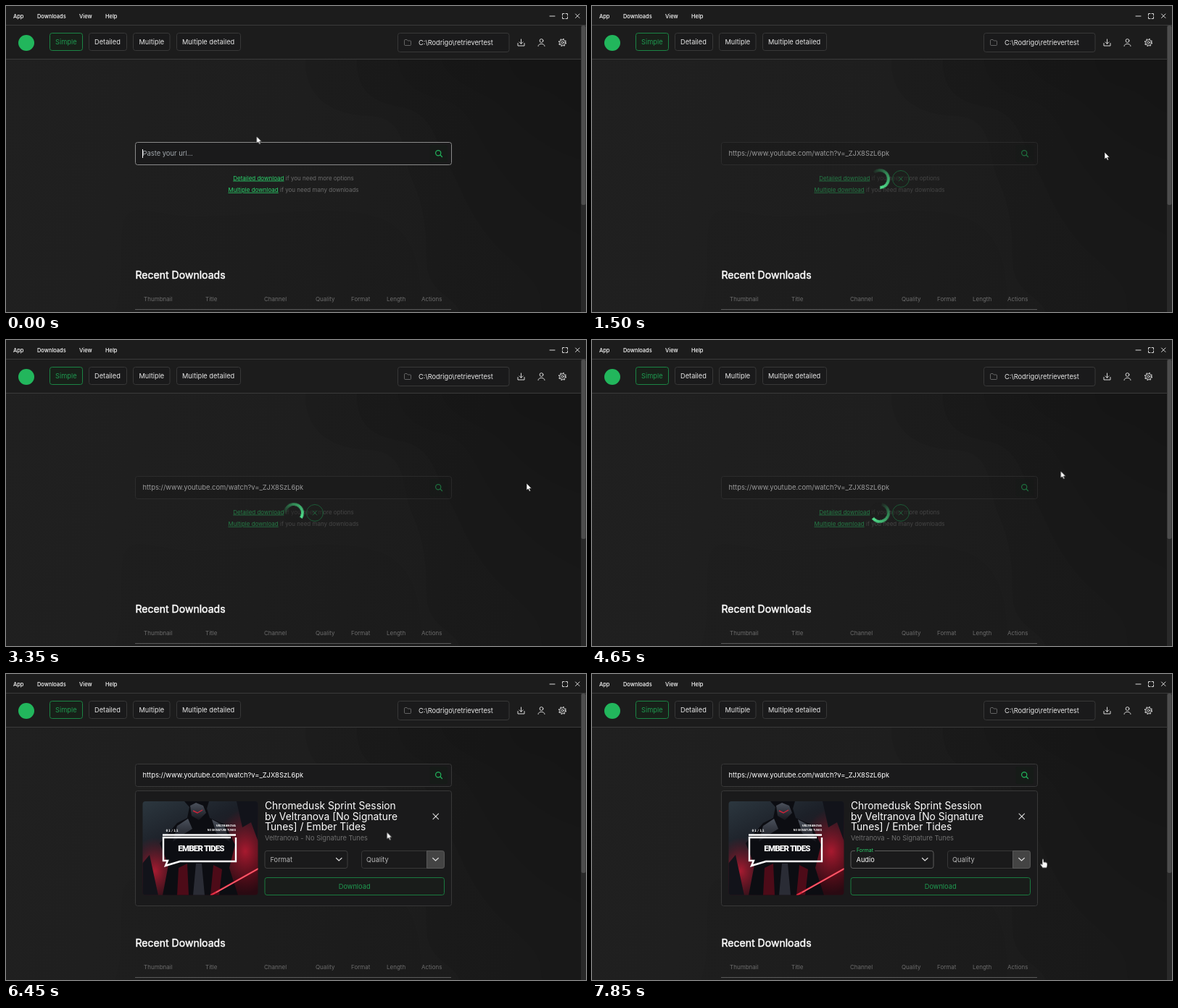
Write an HTML page that moves like this. It is 800 px wide and 423 px high and loops after 8000 ms.

```html
<!DOCTYPE html>
<html lang="en">
<head>
<meta charset="utf-8">
<title>Video downloader</title>
<style>
html, body { margin: 0; width: 100%; height: 100%; overflow: hidden; background: #1c1c1c; }
#stage { position: absolute; left: 0; top: 0; width: 800px; height: 423px; overflow: hidden; }
svg { position: absolute; left: 0; top: 0; }
text { font-family: Inter, "Liberation Sans", sans-serif; font-size: 9.25px; fill: #e8e8e8; }
.menu text { font-size: 7.45px; font-weight: 500; fill: #fff; }
.small text, text.small { font-size: 8px; fill: #6c6c6c; }
.title text { font-size: 13.8px; fill: #fff; }
#search text { font-size: 9.38px; }
.link { fill: #2bd46c; text-decoration: underline; }
.box { fill: #1a1a1b; stroke: #383838; }
.line { fill: none; stroke: #d8d8d8; stroke-linecap: round; stroke-linejoin: round; }
.green { stroke: #22b65c; }

.step, .move { animation: 8s infinite; }
.step { animation-timing-function: step-end; }
.move { animation-timing-function: linear; }

#search { animation-name: search; }
@keyframes search {
  0% { opacity: 1; transform: none; }
  9.375% { opacity: .55; transform: none; }
  75%, 100% { opacity: 1; transform: translateY(-64px); }
}
#field { animation-name: field; }
@keyframes field { 0% { stroke: #8a8a8a; } 9.375%, 100% { stroke: #383838; } }
#caret { animation-name: caret; }
@keyframes caret { 0% { opacity: 1; } 6.875%, 100% { opacity: 0; } }
#hint { animation-name: hint; }
@keyframes hint { 0% { opacity: 1; } 9.375%, 100% { opacity: 0; } }
#url { animation-name: url; }
@keyframes url { 0% { opacity: 0; } 9.375%, 100% { opacity: 1; } }
#links { animation-name: links; }
@keyframes links { 0% { opacity: 1; } 9.375% { opacity: .5; } 75%, 100% { opacity: 0; } }
.busy { animation-name: busy; }
@keyframes busy { 0% { opacity: 0; } 9.375% { opacity: 1; } 75%, 100% { opacity: 0; } }
#card { animation-name: card; }
@keyframes card { 0% { opacity: 0; } 75%, 100% { opacity: 1; } }

#gap { animation-name: gap; }
@keyframes gap { 0% { opacity: 0; } 89%, 100% { opacity: 1; } }
#label { animation-name: label; }
@keyframes label {
  0%, 88.1% { transform: translate(364.5px, 259.5px); fill: #b8b8b8; }
  90%, 100% { transform: translate(365px, 246.2px) scale(.75); fill: #2bd46c; }
}
#select { animation-name: select; }
@keyframes select { 0% { stroke: #3e3e3e; } 88.1%, 100% { stroke: #5c5c5c; } }
#list { animation-name: list; }
@keyframes list { 0% { opacity: 0; } 88.1% { opacity: 1; } 93.75%, 100% { opacity: 0; } }
#hover { animation-name: hover; }
@keyframes hover {
  0% { opacity: 0; transform: translateY(-24.5px); }
  89.4% { opacity: 1; transform: translateY(-24.5px); }
  90.3% { opacity: 1; transform: none; }
  92.5%, 100% { opacity: 1; transform: translateY(-24.5px); }
}
#value { animation-name: value; }
@keyframes value { 0% { opacity: 0; } 93.75%, 100% { opacity: 1; } }

#pointer { animation-name: pointer; }
@keyframes pointer {
  0% { transform: translate(345.5px, 180px); }
  3.125%, 10% { transform: translate(349px, 183px); animation-timing-function: ease-in-out; }
  17.5%, 20% { transform: translate(707px, 202px); }
  30%, 48% { transform: translate(718px, 198px); animation-timing-function: ease-in-out; }
  58.125% { transform: translate(646.5px, 181px); }
  75%, 77% { transform: translate(545px, 212px); }
  78.75% { transform: translate(530px, 217px); }
  80.625% { transform: translate(525.5px, 218.5px); }
  83.125%, 84.5% { transform: translate(500px, 228px); }
  87.5%, 88.5% { transform: translate(425px, 256px); }
  91.25% { transform: translate(398.5px, 296.5px); }
  93%, 94.5% { transform: translate(395px, 284px); animation-timing-function: ease-in-out; }
  98.125%, 100% { transform: translate(622px, 255.5px); }
}
#arrow { animation-name: arrow; }
@keyframes arrow { 0% { opacity: 1; } 86.5%, 100% { opacity: 0; } }
#hand { animation-name: hand; }
@keyframes hand { 0% { opacity: 0; } 86.5%, 100% { opacity: 1; } }

#ring { position: absolute; left: 383px; top: 225px; width: 28px; height: 28px; }
#ring div {
  width: 100%; height: 100%; border-radius: 50%;
  background: conic-gradient(#3ecb7810 0deg, #3ecb7899 90deg, #4fdc8a 210deg, #4fdc8a 219deg, #4fdc8a00 222deg);
  -webkit-mask: radial-gradient(circle, #0000 9.6px, #000 10.2px);
  mask: radial-gradient(circle, #0000 9.6px, #000 10.2px);
  animation: spin 1s linear infinite;
}
@keyframes spin { from { transform: rotate(138deg); } to { transform: rotate(498deg); } }
</style>
</head>
<body>
<div id="stage">
<svg width="800" height="423" viewBox="0 0 800 423">
  <defs>
    <linearGradient id="bg" x1="0" y1="0" x2="1" y2=".15">
      <stop offset="0" stop-color="#202020"/><stop offset=".55" stop-color="#1e1e1e"/><stop offset="1" stop-color="#1b1b1b"/>
    </linearGradient>
    <linearGradient id="sky" x1="0" y1="0" x2=".6" y2="1">
      <stop offset="0" stop-color="#2c373f"/><stop offset=".4" stop-color="#1c2028"/><stop offset="1" stop-color="#2a0a12"/>
    </linearGradient>
    <linearGradient id="steel" x1="0" y1="0" x2="0" y2="1">
      <stop offset="0" stop-color="#4b515c"/><stop offset="1" stop-color="#15161c"/>
    </linearGradient>
    <radialGradient id="glow"><stop offset="0" stop-color="#d41c36" stop-opacity=".75"/><stop offset="1" stop-color="#a01024" stop-opacity="0"/></radialGradient>
    <clipPath id="frame"><rect x="188.5" y="176" width="159" height="129.5" rx="4"/></clipPath>
  </defs>

  <!-- backdrop -->
  <rect width="800" height="423" fill="url(#bg)"/>
  <g fill="#000" fill-opacity=".06">
    <path d="M413 74C412 125 445 150 500 152S545 205 560 240 580 300 580 350 620 400 625 423H800V74Z"/>
    <path d="M484 74C484 115 500 132 545 140S592 190 610 220 640 300 690 345 735 390 740 423H800V74Z"/>
    <path d="M541 74C543 108 570 122 605 130S650 185 680 225 735 290 800 320V74Z"/>
    <path d="M601 74C606 100 640 112 668 128S715 190 800 215V74Z"/>
    <path d="M694 74C696 100 716 108 740 115S775 145 800 150V74Z"/>
  </g>
  <path d="M150 423C165 390 155 330 162 300S195 285 240 290 420 278 480 285 575 320 572 423Z" fill="#000" fill-opacity=".04"/>

  <!-- title bar -->
  <rect width="800" height="73" fill="#1c1c1c"/>
  <path d="M0 26.5H800M0 73.5H793" stroke="#3b3b3b"/>
  <g class="menu">
    <text x="10" y="16.8">App</text><text x="43" y="16.8">Downloads</text>
    <text x="101" y="16.8">View</text><text x="137" y="16.8">Help</text>
  </g>
  <g class="line">
    <path d="M750 14H757"/>
    <path d="M767.5 13V10.5H770M772 10.5H774.5V13M774.5 15V17.5H772M770 17.5H767.5V15"/>
    <path d="M785.5 11 791 16.5M791 11 785.5 16.5"/>
  </g>

  <!-- toolbar -->
  <circle cx="28" cy="51" r="11" fill="#22b65c"/>
  <g class="box">
    <rect x="60.5" y="37.5" width="45" height="24" rx="3" style="fill:#182019;stroke:#1b8444"/>
    <rect x="114.5" y="37.5" width="52" height="24" rx="3"/>
    <rect x="175.5" y="37.5" width="50.5" height="24" rx="3"/>
    <rect x="235.5" y="37.5" width="88" height="24" rx="3"/>
    <rect x="540.5" y="37.5" width="153.5" height="26" rx="3"/>
  </g>
  <text x="68" y="52.8" style="fill:#1f9a50">Simple</text>
  <text x="122" y="52.8">Detailed</text>
  <text x="183.5" y="52.8">Multiple</text>
  <text x="243" y="52.8">Multiple detailed</text>
  <text x="569" y="54">C:\Rodrigo\retrievertest</text>
  <path class="line" d="M549.5 47.5Q549.5 46.5 550.5 46.5H553L554.2 48H557.5Q558.5 48 558.5 49V53.5Q558.5 54.5 557.5 54.5H550.5Q549.5 54.5 549.5 53.5Z" stroke-width=".8" style="stroke:#777"/>
  <g class="line">
    <path d="M710.5 46V52M708 49.8 710.5 52.3 713 49.8M706 51.5V55H715V51.5"/>
    <circle cx="738.5" cy="48" r="2.4"/><path d="M734 55.5C734 51.2 743 51.2 743 55.5"/>
    <circle cx="767.5" cy="50.5" r="1.6"/><circle cx="767.5" cy="50.5" r="3.9"/>
    <circle cx="767.5" cy="50.5" r="5" stroke-width="1.1" stroke-dasharray="1.963 1.963" style="stroke-linecap:butt"/>
  </g>
  <rect x="793" y="27" width="7" height="396" fill="#292929"/>
  <rect x="793.5" y="27" width="6" height="248" rx="2.5" fill="#4d4d4d"/>

  <!-- recent downloads -->
  <text x="178.5" y="377.3" style="font-size:14.05px;fill:#fff;stroke:#fff;stroke-width:.45px">Recent Downloads</text>
  <g class="small">
    <text x="190" y="407.8">Thumbnail</text><text x="275" y="407.8">Title</text><text x="356" y="407.8">Channel</text>
    <text x="427" y="407.8">Quality</text><text x="476" y="407.8">Format</text><text x="525" y="407.8">Length</text><text x="573" y="407.8">Actions</text>
  </g>
  <path d="M178 419.5H614" stroke="#5a5a5a"/>

  <!-- search -->
  <g id="search" class="step">
    <rect id="field" class="box step" x="178.5" y="188.5" width="436" height="31" rx="3"/>
    <rect x="584.5" y="192" width="24.5" height="24" rx="3" fill="#161b18"/>
    <g class="line green" stroke-width="1.2"><circle cx="596.2" cy="203.2" r="3.6"/><path d="M599 206 601.5 208.5"/></g>
    <text id="hint" class="step" x="188.5" y="207.4" style="fill:#a3a9ae">Paste your url...</text>
    <text id="url" class="step" x="188.5" y="207.4" style="fill:#fff">https://www.youtube.com/watch?v=_ZJX8SzL6pk</text>
    <path id="caret" class="step" d="M188.5 198V210" stroke="#fff"/>
  </g>
  <g id="links" class="small step" text-anchor="middle">
    <text x="396.5" y="240.6"><tspan class="link">Detailed download</tspan> if you need more options</text>
    <text x="396.5" y="256.8"><tspan class="link">Multiple download</tspan> if you need many downloads</text>
  </g>
  <g class="busy step">
    <g class="line" style="stroke:#1d5a37"><circle cx="426" cy="239" r="11.5" fill="#1b1f1c" fill-opacity=".5"/><path d="M423 236 429 242M429 236 423 242"/></g>
    <circle cx="397" cy="239" r="14" fill="#1c1c1c" fill-opacity=".4"/>
  </g>

  <!-- result -->
  <g id="card" class="step">
    <rect class="box" x="178.5" y="161.5" width="436" height="159" rx="3"/>
    <g clip-path="url(#frame)">
      <rect x="188" y="176" width="160" height="130" fill="url(#sky)"/>
      <ellipse cx="330" cy="245" rx="42" ry="58" fill="url(#glow)"/>
      <ellipse cx="205" cy="272" rx="36" ry="46" fill="url(#glow)"/>
      <path d="M188 306V262L198 250 210 306ZM318 176H348V232L338 205 326 212Z" fill="#12131a"/>
      <path d="M216 306 224 264 212 234 236 206 250 199 253 184 246 176H280L277 186 281 199 302 208 316 236 308 268 320 306Z" fill="#0c0d12"/>
      <path d="M236 210 251 200 257 214 244 222 230 232ZM284 201 301 210 309 232 290 220Z" fill="url(#steel)"/>
      <path d="M254 182 262 178 272 182 276 192 266 202 256 196Z" fill="url(#steel)"/>
      <path d="M238 268 250 262 252 306H236ZM286 264 298 270 294 306H282Z" fill="#4d0b18"/>
      <path d="M262 262 270 262 274 306H258Z" fill="#2a2c35"/>
      <path d="M258 189 264 192 271 188" fill="none" stroke="#d02238" stroke-width="1.4"/>
      <path d="M282 306 348 269" stroke="#e52c42" stroke-width="2.4"/><path d="M290 302 348 269" stroke="#ff9aa2" stroke-width=".7"/>
      <path d="M216 222.5H317M317 226V259H240L220 265 223 258H217V226H310" fill="none" stroke="#fff" stroke-width="2.4"/>
      <g text-anchor="end" font-weight="700">
        <text x="317" y="211" style="font-size:4px;fill:#fff">VELTRANOVA</text>
        <text x="317" y="216.5" style="font-size:3.5px;fill:#fff">NO SIGNATURE TUNES</text>
      </g>
      <text x="220.5" y="217.5" style="font:700 4.6px 'DejaVu Sans Mono',monospace;fill:#fff;letter-spacing:.8px">01/11</text>
      <text x="269" y="244.5" text-anchor="middle" style="font:900 11.5px Roboto,sans-serif;fill:#fff;letter-spacing:-.8px">EMBER TIDES</text>
    </g>
    <g class="title">
      <text x="357" y="187.3">Chromedusk Sprint Session</text>
      <text x="357" y="201.5">by Veltranova [No Signature</text>
      <text x="357" y="215.7">Tunes] / Ember Tides</text>
    </g>
    <text x="357" y="230.2" style="fill:#707070">Veltranova - No Signature Tunes</text>
    <path class="line" d="M589 193.2 596.5 200.7M596.5 193.2 589 200.7" stroke-width="1.1"/>

    <rect id="select" class="box step" x="357" y="244.5" width="114" height="24" rx="3"/>
    <rect id="gap" class="step" x="363" y="243" width="27" height="3" fill="#1a1a1b"/>
    <text id="label" class="move">Format</text>
    <text id="value" class="step" x="364.5" y="259.7" style="fill:#fff">Audio</text>
    <rect class="box" x="490.5" y="244.5" width="114" height="24" rx="3"/>
    <path d="M580.5 244.5H601.5Q604.5 244.5 604.5 247.5V265.5Q604.5 268.5 601.5 268.5H580.5Z" fill="#444" stroke="#585858"/>
    <text x="497" y="259.5" style="fill:#b8b8b8">Quality</text>
    <path class="line" d="M455.5 254.5 459.2 258 463 254.5M588.7 254.5 592.5 258 596.3 254.5" stroke-width="1.2"/>

    <rect x="357" y="281.5" width="247.5" height="24" rx="3" fill="#191c1a" stroke="#1a7a3f"/>
    <text x="480.7" y="296.8" text-anchor="middle" style="fill:#1f9a50">Download</text>

    <g id="list" class="step">
      <rect x="357.5" y="270.5" width="113" height="53" rx="3" fill="#1a1a1b" stroke="#4c4c4c"/>
      <rect id="hover" class="step" x="359.5" y="297" width="108.5" height="24" rx="2" fill="#404040"/>
      <text x="367" y="288" style="fill:#fff">Audio</text>
      <text x="367" y="312.6" style="fill:#fff">Video</text>
    </g>
  </g>
</svg>

<div id="ring" class="busy step"><div></div></div>

<svg width="800" height="423" viewBox="0 0 800 423">
  <g id="pointer" class="move" fill="#fff" stroke="#111" stroke-width=".6" stroke-linejoin="round">
    <path id="arrow" class="step" d="M0 0V9.8L2.3 7.8 3.9 11.3 5.5 10.6 4 7.2H7Z"/>
    <path id="hand" class="step" d="M-1 1Q0-.8 1 1V4.5Q2.2 3.7 2.7 4.8 4 4 4.5 5.3 6 4.8 6 6.5V9Q6 10.5 5 12.5H-.5Q-1.5 10.5-3.4 8.5-4.2 7-3 6.8-2 6.8-1 8.2Z"/>
  </g>
</svg>
</div>
</body>
</html>
```
